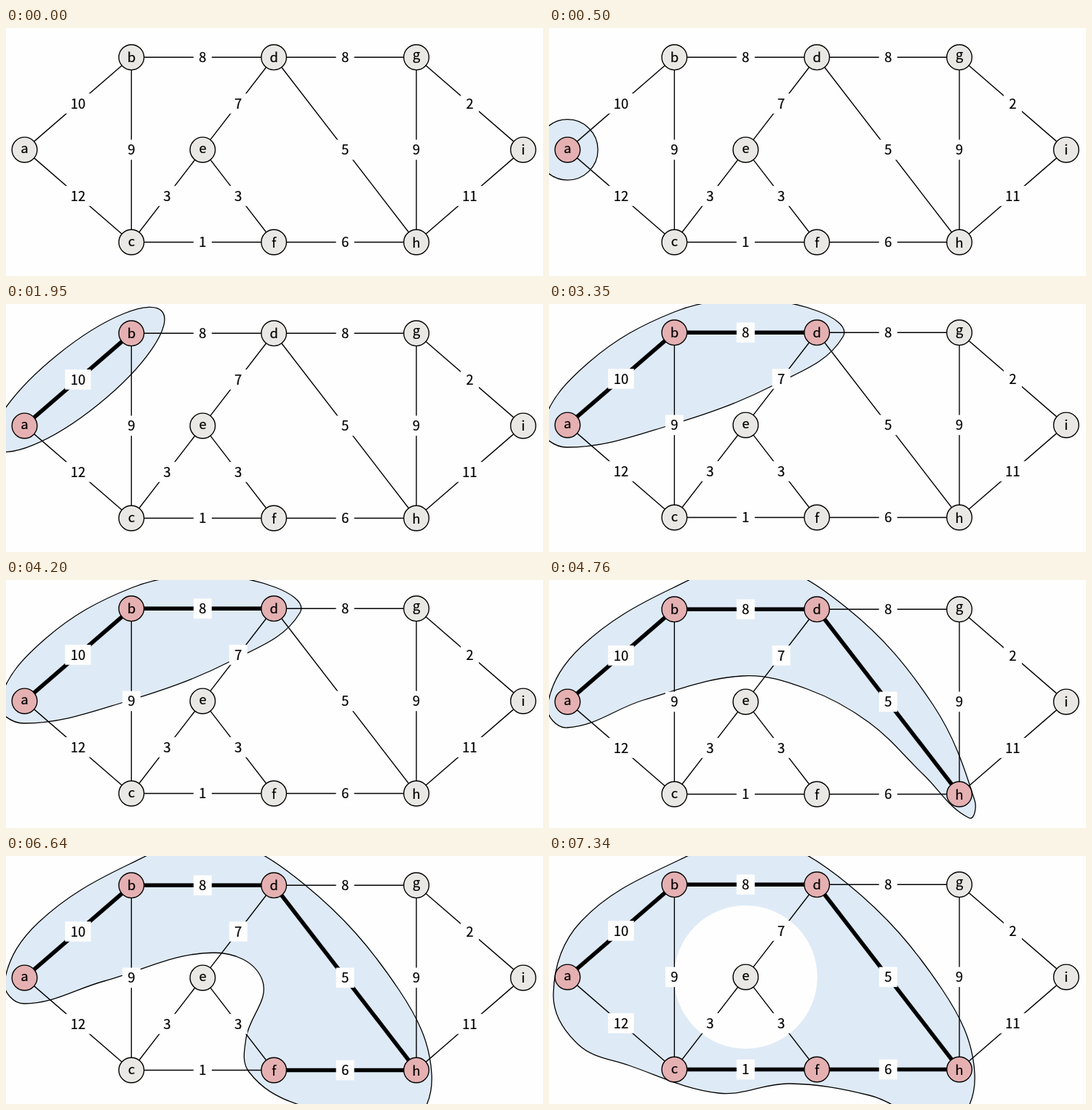
These frames come from a looping animation (738x341 px, 8000 ms). An HTML page:

```html
<!DOCTYPE html>
<html lang="en">
<head>
<meta charset="utf-8">
<title>Growing a spanning tree</title>
<style>
html, body { margin: 0; width: 100%; height: 100%; overflow: hidden; background: #fefefe; }
svg { display: block; width: 738px; height: 341px; }
text {
  font: 18.5px "Noto Sans CJK JP", "Noto Sans CJK SC", "Noto Sans CJK", "Noto Sans", sans-serif;
  text-anchor: middle; stroke: #000; stroke-width: .2px;
}
</style>
</head>
<body>
<svg viewBox="0 0 738 341">
  <g id="scene">
    <path id="region" fill="#deeaf6" stroke="#000" stroke-width="1.3"/>
  </g>
</svg>
<script>
const LOOP = 8000;
const PAPER = '#fefefe';
const scene = document.getElementById('scene');
const region = document.getElementById('region');

// Nodes sit on a grid: column in units, row 0 to 2.
const spot = (col, row) => ({ x: 25.5 + 97.9 * col, y: 40.3 + 127.1 * row });
const nodes = {
  a: spot(0, 1), b: spot(1.5, 0), c: spot(1.5, 2),
  d: spot(3.5, 0), e: spot(2.5, 1), f: spot(3.5, 2),
  g: spot(5.5, 0), h: spot(5.5, 2), i: spot(7, 1)
};
const edges = 'ab10 ac12 bc9 bd8 ce3 cf1 de7 ef3 dg8 dh5 fh6 gh9 gi2 hi11'
  .split(' ').map(s => ({ id: s.slice(0, 2), p: nodes[s[0]], q: nodes[s[1]], weight: s.slice(2) }));

// Order in which nodes and edges join the tree.
const joined = 'abdhfc';
const tree = ['ab', 'bd', 'dh', 'fh', 'cf'];

// Baseline offset that centres each glyph on its node.
const drop = ch => 'ace'.includes(ch) ? 5 : ch === 'g' ? 2.8 : 7;

function add(tag, attrs, text) {
  const el = document.createElementNS('http://www.w3.org/2000/svg', tag);
  for (const k in attrs) el.setAttribute(k, attrs[k]);
  if (text !== undefined) el.textContent = text;
  return scene.appendChild(el);
}

const hole = add('circle', { cx: nodes.e.x, cy: nodes.e.y, r: 98.5, fill: PAPER });
for (const e of edges) {
  e.line = add('line', { x1: e.p.x, y1: e.p.y, x2: e.q.x, y2: e.q.y, stroke: '#000' });
}
for (const { p, q, weight } of edges) {
  const x = (p.x + q.x) / 2, y = (p.y + q.y) / 2;
  const width = 14.5 + 10.5 * weight.length;
  add('rect', { x: x - width / 2, y: y - 13.8, width, height: 27.6, fill: PAPER });
  add('text', { x, y: y + 6.9 }, weight);
}
for (const n in nodes) {
  const { x, y } = nodes[n];
  nodes[n].disc = add('circle', { cx: x, cy: y, r: 17.3, stroke: '#000', 'stroke-width': 1.4 });
  add('text', { x, y: y + drop(n) }, n);
}

// Closed curve: tangents follow the neighbours, handles follow the segment length.
function blob(...parts) {
  const pts = parts.join(' ').split(' ').map(s => s.split(',').map(Number));
  const at = i => pts[(i + pts.length) % pts.length];
  const handle = (i, reach) => {
    const [o, p, q] = [at(i - 1), at(i), at(i + 1)];
    const dx = q[0] - o[0], dy = q[1] - o[1], k = reach / Math.hypot(dx, dy);
    return [p[0] + dx * k, p[1] + dy * k];
  };
  return 'M' + pts[0] + pts.map((p, i) => {
    const q = at(i + 1);
    const reach = 0.36 * Math.hypot(q[0] - p[0], q[1] - p[1]);
    return `C${handle(i, reach)} ${handle(i + 1, -reach)} ${q}`;
  }).join('') + 'Z';
}

function oval(x, y, rx, ry, turn) {
  const t = turn * Math.PI / 180, dx = rx * Math.cos(t), dy = rx * Math.sin(t);
  const arc = `A${rx} ${ry} ${turn} 0 1 `;
  return `M${x - dx} ${y - dy}${arc}${x + dx} ${y + dy}${arc}${x - dx} ${y - dy}Z`;
}

// Stretches of outline shared by the later regions.
const west = '25,203 -2,172 45,91 170,11';
const crest = '285,-24 410,39';
const east = '540,184 585,300 550,368';

const { a, b } = nodes;
const steps = [
  { at: 0, d: '' },
  { at: 500, d: oval(a.x, a.y, 41.7, 41.7, 0) },
  { at: 1950, d: oval((a.x + b.x) / 2, (a.y + b.y) / 2, 148.7, 44.2, -38.9) },
  { at: 3350, lift: 1, d: blob('25,198 -9,169 55,81 172,12 270,-5 370,11 404,46 310,112 165,168') },
  { at: 4760, d: blob(west, crest, '528,172 585,303 577,327 515,268 440,196 355,150 265,132 130,165') },
  { at: 5600, d: blob(west, crest, east, '400,341 334,297 330,250 352,170 285,133 135,172') },
  { at: 7340, lift: 1, d: blob('6,191 44,91 180,6', crest, east, '440,330 330,314 233,327 110,289 40,260') }
];

function draw(time) {
  const t = time % LOOP;
  const n = steps.filter(s => s.at <= t).length - 1;
  const { d, lift = 0 } = steps[n];
  const reached = joined.slice(0, n);
  const chosen = tree.slice(0, Math.max(0, n - 1));
  region.setAttribute('d', d);
  hole.setAttribute('visibility', n === joined.length ? 'visible' : 'hidden');
  scene.setAttribute('transform', `translate(0 ${-lift})`);
  for (const e of edges) e.line.setAttribute('stroke-width', chosen.includes(e.id) ? 5.5 : 1.4);
  for (const k in nodes) nodes[k].disc.setAttribute('fill', reached.includes(k) ? '#e5b0b1' : '#e9e8e4');
}

const start = performance.now();
function tick() {
  draw(performance.now() - start);
  requestAnimationFrame(tick);
}
tick();
</script>
</body>
</html>
```
